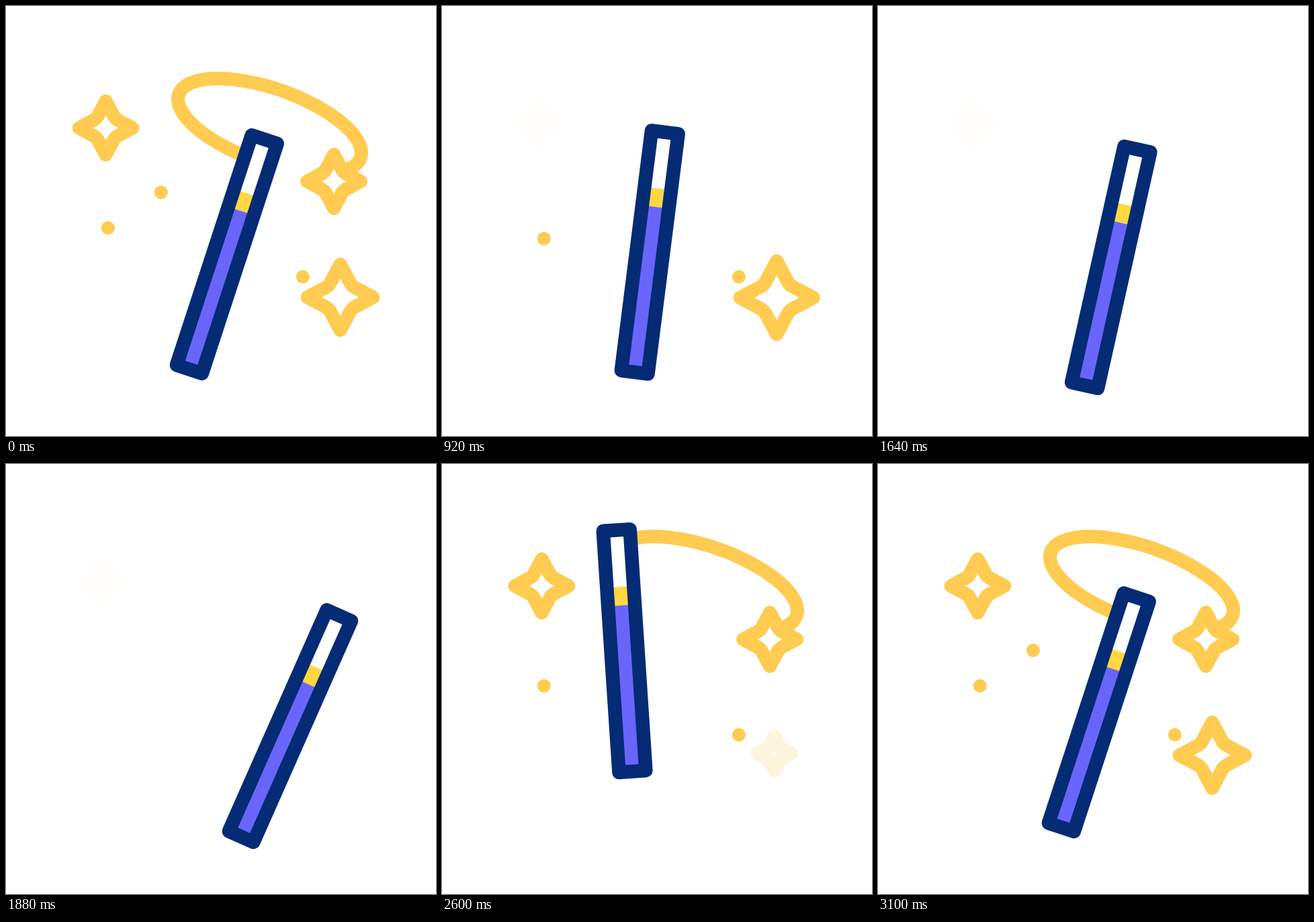
These frames come from a looping animation (640 px wide and 640 px high, 3600 ms). An HTML page with a canvas:

```html
<!DOCTYPE html>
<html lang="en">
<head>
<meta charset="utf-8">
<title>Magic wand</title>
<style>
  html, body { margin: 0; width: 100%; height: 100%; overflow: hidden; background: #fff; }
  canvas { display: block; width: 640px; height: 640px; }
</style>
</head>
<body>
<canvas id="stage"></canvas>
<script>
const LOOP = 3600;
const GOLD = '#ffcb50', NAVY = '#042b74', VIOLET = '#6a65fa', YELLOW = '#ffd740';
const RAD = Math.PI / 180;

// Key poses: time, x and y of the inner top edge's middle, tilt in degrees
const REST = [381.5, 208.2, 18.1];
const WAND = [
  [220, ...REST], [920, 330.5, 198, 7.2], [1320, 410.5, 226.3, 21.8],
  [1640, 383.5, 223.2, 12.56], [1920, 501, 231, 25], [2160, 455, 148.4, 21.6],
  [2600, 260.6, 108.6, -3.75], [2900, 286, 171, 4], [3100, ...REST]
];

const TRAIL = { x: 392.5, y: 178.5, a: 143.3, b: 55.3, tilt: 19.3 * RAD, start: 22 * RAD, in: 1920 };

// drift: how far the centre moves per pixel of growth
const STARS = [
  { x: 148.5, y: 181.5, r: 40, drift: [.36, .42], out: 280, in: 2260, faint: .025 },
  { x: 488, y: 261, r: 40, drift: [-.5, .35], out: 220, in: 1935, faint: 0 },
  { x: 497.5, y: 433.5, r: 49, drift: [.12, .12], out: 730, in: 2580, faint: 0 }
];
const SMALL = 23.5, BOUNCE = 12;

const DOTS = [
  { x: 230.8, y: 277.5, out: 300, in: 2780 },
  { x: 151.8, y: 330.2, out: 700, in: 2420 },
  { x: 441.8, y: 403, out: 1150, in: 2118 }
];

const canvas = document.getElementById('stage');
const ctx = canvas.getContext('2d');
const dpr = window.devicePixelRatio || 1;
canvas.width = canvas.height = 640 * dpr;

const linear = p => p;
const smooth = p => p * p * (3 - 2 * p);

// Value at time t from [time, value] pairs
function tween(keys, t, ease) {
  if (t <= keys[0][0]) return keys[0][1];
  for (let i = 1; i < keys.length; i++) {
    const [t0, a] = keys[i - 1], [t1, b] = keys[i];
    if (t < t1) return a + (b - a) * ease((t - t0) / (t1 - t0));
  }
  return keys[keys.length - 1][1];
}

// Smooth curve through column c of the key poses
function spline(keys, t, c) {
  const last = keys.length - 1;
  if (t <= keys[0][0]) return keys[0][c];
  if (t >= keys[last][0]) return keys[last][c];
  let i = 0;
  while (t >= keys[i + 1][0]) i++;
  const slope = k => k === 0 || k === last ? 0
    : (keys[k + 1][c] - keys[k - 1][c]) / (keys[k + 1][0] - keys[k - 1][0]);
  const [a, b] = [keys[i], keys[i + 1]];
  const d = b[0] - a[0], p = (t - a[0]) / d, q = 1 - p;
  return a[c] * (1 + 2 * p) * q * q + slope(i) * d * p * q * q
    + b[c] * p * p * (3 - 2 * p) - slope(i + 1) * d * p * p * q;
}

const wandPose = t => [1, 2, 3].map(c => spline(WAND, t, c));

// Angle on the trail's ellipse that lies under the wand's tip
function tipAngle(t) {
  const [x, y] = wandPose(t);
  const dx = x - TRAIL.x, dy = y - TRAIL.y;
  const cos = Math.cos(TRAIL.tilt), sin = Math.sin(TRAIL.tilt);
  const angle = Math.atan2((dy * cos - dx * sin) / TRAIL.b, (dx * cos + dy * sin) / TRAIL.a);
  return angle > TRAIL.start ? angle - 2 * Math.PI : angle;
}

function drawTrail(t) {
  const full = tipAngle(LOOP);
  const drawing = t >= TRAIL.in;
  const from = drawing ? TRAIL.start : tween([[220, TRAIL.start], [720, full]], t, smooth);
  const to = drawing ? tipAngle(t) : full;
  if (from <= to) return;
  ctx.beginPath();
  ctx.ellipse(TRAIL.x, TRAIL.y, TRAIL.a, TRAIL.b, TRAIL.tilt, from, to, true);
  ctx.stroke();
}

function drawStar(s, t) {
  const low = SMALL - s.r;
  const growth = tween([
    [s.out, 0], [s.out + 400, BOUNCE], [s.out + 550, low],
    [s.in, low], [s.in + 150, BOUNCE], [s.in + 340, 0]
  ], t, smooth);
  const r = s.r + growth;
  ctx.save();
  ctx.globalAlpha = tween([
    [s.out + 450, 1], [s.out + 550, s.faint], [s.in, s.faint], [s.in + 110, 1]
  ], t, linear);
  ctx.translate(s.x + growth * s.drift[0], s.y + growth * s.drift[1]);
  ctx.beginPath();
  for (let i = 0; i < 4; i++) {
    const cos = [1, 0, -1, 0][i], sin = [0, 1, 0, -1][i];
    const at = (x, y) => [r * (x * cos - y * sin), r * (x * sin + y * cos)];
    ctx.lineTo(...at(1, 0));
    ctx.lineTo(...at(.42, .31));
    ctx.quadraticCurveTo(...at(.35, .35), ...at(.31, .42));
  }
  ctx.closePath();
  ctx.stroke();
  ctx.restore();
}

function drawDot(d, t) {
  const drop = t < d.in ? tween([[d.out, 0], [d.out + 220, 16]], t, smooth) : 0;
  ctx.globalAlpha = tween([[d.out + 220, 1], [d.out + 320, 0], [d.in, 0], [d.in + 120, 1]], t, linear);
  ctx.beginPath();
  ctx.arc(d.x, d.y + drop, 10, 0, 2 * Math.PI);
  ctx.fill();
  ctx.globalAlpha = 1;
}

function drawWand(t) {
  const [x, y, tilt] = wandPose(t);
  ctx.save();
  ctx.translate(x, y);
  ctx.rotate(tilt * RAD);
  const band = (color, top, bottom) => {
    ctx.fillStyle = color;
    ctx.fillRect(-11, top, 22, bottom - top);
  };
  band('#fff', -2, 76);
  band(VIOLET, 101, 342);
  band(YELLOW, 74.2, 102);
  ctx.strokeStyle = NAVY;
  ctx.lineWidth = 20.5;
  ctx.strokeRect(-20, -10.2, 40, 360);
  ctx.restore();
}

function draw(t) {
  ctx.setTransform(dpr, 0, 0, dpr, 0, 0);
  ctx.fillStyle = '#fff';
  ctx.fillRect(0, 0, 640, 640);
  ctx.lineJoin = ctx.lineCap = 'round';
  ctx.lineWidth = 20;
  ctx.strokeStyle = ctx.fillStyle = GOLD;
  drawTrail(t);
  STARS.forEach(s => drawStar(s, t));
  DOTS.forEach(d => drawDot(d, t));
  drawWand(t);
}

const start = performance.now();
function frame() {
  draw((performance.now() - start) % LOOP);
  requestAnimationFrame(frame);
}
frame();
</script>
</body>
</html>
```
